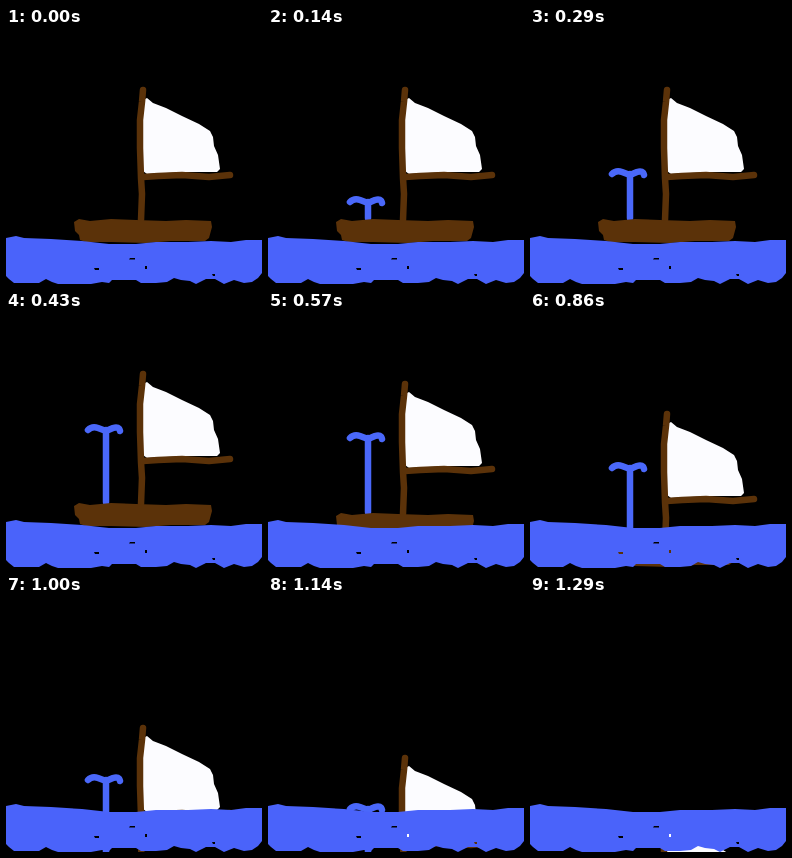
An HTML page that plays this animation: 256 px wide and 256 px high, repeating every 1440 ms.

```html
<!DOCTYPE html>
<html lang="en">
<head>
<meta charset="utf-8">
<title>Sinking boat</title>
<style>
html, body { margin: 0; height: 100%; overflow: hidden; background: #000; }
svg { display: block; width: 100%; height: 100%; }
.line { fill: none; stroke-linecap: round; stroke-linejoin: round; }
</style>
</head>
<body>
<svg viewBox="0 0 256 256">
  <path id="spout" class="line" stroke="#4a68fa" stroke-width="6.5"/>
  <g id="boat">
    <path fill="#fcfcff" d="M137 72 L141 70 L147 75 L160 80 L176 88 L193 96 L204 103 L207 109 L208 118 L212 127 L214 141 L211 144 L184 144 L160 145 L141 146 L137 143Z"/>
    <g class="line" stroke="#5b3209" stroke-width="6.5">
      <path d="M137 62 L136 74 L134 92 L134 120 L135 150 L136 166 L135 192"/>
      <path d="M137 149 L152 148 L176 147 L203 149 L224 147"/>
    </g>
    <path fill="#5b3209" d="M68 194 L73 191 L84 193 L105 191 L130 192 L160 193 L180 192 L205 193 L206 199 L203 210 L199 213 L165 213 L140 215 L105 214 L80 214 L74 212 L73 207 L69 203Z"/>
  </g>
  <!-- gaps in the water let the boat show through -->
  <path fill="#4a63fa" fill-rule="evenodd" d="M0 210 L10 208 L18 210 L45 211 L76 213 L103 216 L130 216 L150 214 L182 214 L205 213 L225 214 L240 212 L256 212
    V245 L252 250 L246 254 L238 255 L228 252 L218 256 L209 251 L200 251 L190 256 L184 253 L175 252 L168 250 L161 254 L150 255 L135 255 L130 252 L118 252 L106 252 L103 255 L96 254 L85 256 L52 256 L46 254 L40 251 L33 255 L8 255 L3 251 L0 248Z
    M88 240 h5 v2 h-4z M124 230 h5 v1.5 h-6z M139 238 h2 v3 h-2z M206 246 h3 v2 h-2z"/>
</svg>
<script>
const starts = [0, 140, 290, 430, 570, 710, 860, 1000, 1140, 1290];
const sink = [0, 0, 0, 0, 10, 22, 40, 70, 100, 158];
const spoutTop = [null, 168, 140, 112, 120, 130, 150, 178, 207, 262];
const boat = document.getElementById('boat');
const spout = document.getElementById('spout');

function draw(now) {
  const t = now % 1440;
  const step = starts.findLastIndex(s => t >= s);
  const y = spoutTop[step];
  boat.setAttribute('transform', `translate(0 ${sink[step]})`);
  spout.setAttribute('d', y === null ? '' :
    `M82 ${y + 6} q4 -4 10 -2 l8 3 l7 -3 q6 -2 7 3 M100 ${y + 6} V${190 + sink[step]}`);
}

const begin = performance.now();
function tick() {
  draw(performance.now() - begin);
  requestAnimationFrame(tick);
}
tick();
</script>
</body>
</html>
```
